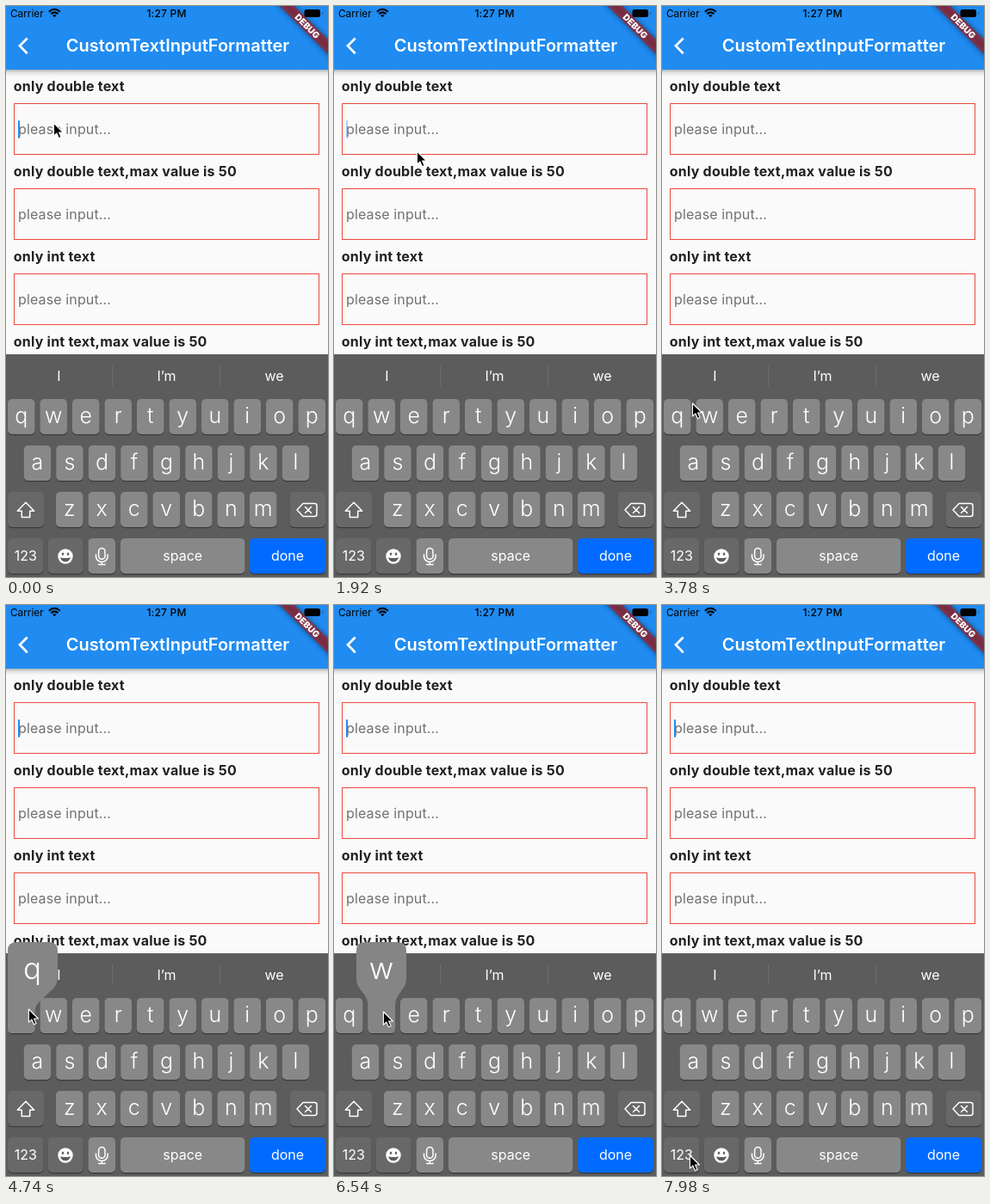
An HTML page that plays this animation: 374 by 664 pixels, repeating every 8 s.

```html
<!DOCTYPE html>
<html lang="en">
<head>
<meta charset="utf-8">
<title>Text input formatter</title>
<style>
html, body { margin: 0; width: 100%; height: 100%; overflow: hidden; background: #fafafa; }
svg { display: block; width: 374px; height: 664px; }
text { font-family: Inter, Roboto, sans-serif; fill: #fff; white-space: pre; }
.mid { text-anchor: middle; }
.label { font-size: 16px; font-weight: 700; letter-spacing: .22px; fill: #212121; }
.hint { font-size: 16px; letter-spacing: .13px; fill: #717171; }
.key { font-size: 25px; font-weight: 300; }
.word { font-size: 16px; }
.line { fill: none; stroke: #fff; stroke-width: 1.5; stroke-linejoin: round; stroke-linecap: round; }
</style>
</head>
<body>
<svg id="stage" viewBox="0 0 374 664">
  <defs>
    <filter id="soft" x="-20%" y="-100%" width="140%" height="300%"><feGaussianBlur stdDeviation="3"/></filter>
    <linearGradient id="drop" x2="0" y2="1">
      <stop stop-color="#000" stop-opacity=".3"/>
      <stop offset=".4" stop-color="#000" stop-opacity=".1"/>
      <stop offset="1" stop-color="#000" stop-opacity="0"/>
    </linearGradient>
  </defs>
  <rect width="374" height="664" fill="#fafafa"/>
  <g id="form"></g>
  <rect id="caret" x="14" y="133" width="2" height="21" rx="1" fill="#218bf0"/>

  <rect y="74" width="374" height="8" fill="url(#drop)"/>
  <rect width="374" height="74" fill="#208bf0"/>
  <path class="line" style="stroke-width:2.7;stroke-linecap:butt;stroke-linejoin:miter" d="M24.7 37.5L16 46.3L24.7 55.2"/>
  <text class="mid" x="199.5" y="53.3" font-size="20" font-weight="600">CustomTextInputFormatter</text>
  <g transform="translate(374 -.5) rotate(45)">
    <rect x="-50" y="28" width="100" height="12" fill="#000" opacity=".5" filter="url(#soft)"/>
    <rect x="-50" y="28" width="100" height="12" fill="#b71c1c" opacity=".627"/>
    <text class="mid" y="37.7" font-size="10.2" font-weight="900">DEBUG</text>
  </g>
  <text x="5" y="13" font-size="11.8" style="fill:#000">Carrier</text>
  <g fill="none" stroke="#000" stroke-width="2">
    <path d="M49.8 6.8Q56.3 .8 62.8 6.8M52.2 9.2Q56.3 5.6 60.4 9.2"/>
    <path d="M54 10.8Q56.3 9 58.6 10.8L56.3 13.2Z" fill="#000" stroke="none"/>
  </g>
  <text class="mid" x="186.5" y="13" font-size="12" font-weight="500" letter-spacing=".2" style="fill:#000">1:27 PM</text>
  <rect x="346.5" y="4" width="18.5" height="9" rx="2.5" fill="#000"/>
  <path d="M367 6.7Q368.8 8.5 367 10.3Z" fill="#000" opacity=".6"/>

  <rect y="405" width="374" height="259" fill="#5c5c5c"/>
  <path d="M123.5 418V442M248.5 418V442" stroke="#6e6e6e"/>
  <g id="keys"></g>
  <path class="line" d="M23 577.3L13.3 587.3H18.3V594.5H27.7V587.3H32.7Z"/>
  <path class="line" d="M345 578.5H358.5Q361 578.5 361 581V591Q361 593.5 358.5 593.5H345L338 586ZM347.5 582.5L354.5 589.5M354.5 582.5L347.5 589.5"/>
  <circle cx="69" cy="640" r="8.7" fill="#fff"/>
  <g fill="#5c5c5c">
    <ellipse cx="66" cy="637.3" rx="1.2" ry="1.7"/>
    <ellipse cx="72" cy="637.3" rx="1.2" ry="1.7"/>
    <path d="M63 641.2Q69 643 75 641.2Q73.8 646.3 69 646.3T63 641.2Z"/>
  </g>
  <rect class="line" x="107.6" y="630.5" width="7.4" height="12.8" rx="3.7"/>
  <path class="line" d="M104.5 638V640.2A6.8 6.2 0 0 0 118.1 640.2V638M111.3 646.5V649.3M107.5 649.5H115.1"/>
  <g id="popups"></g>
  <path id="pointer" d="M-.6 0V15.2L2.9 12L5.4 17.8L8.1 16.6L5.6 11H10.4Z" fill="#000" stroke="#fff" stroke-width="1.1" stroke-linejoin="round"/>
</svg>
<script>
const byId = id => document.getElementById(id);

function add(parent, tag, attrs, text) {
  const node = document.createElementNS("http://www.w3.org/2000/svg", tag);
  for (const name in attrs) node.setAttribute(name, attrs[name]);
  if (text) node.textContent = text;
  byId(parent).append(node);
  return node;
}

// Form
["only double text", "only double text,max value is 50", "only int text", "only int text,max value is 50"]
  .forEach((title, i) => {
    const y = i * 99;
    add("form", "text", { class: "label", x: 8.8, y: y + 99 }, title);
    if (i === 3) return;
    add("form", "rect", { x: 9.5, y: y + 113.5, width: 354, height: 59, fill: "none", stroke: "#ec4a40" });
    add("form", "text", { class: "hint", x: 14, y: y + 148.8 }, "please input...");
  });

// Keyboard
const LIGHT = "#888", DARK = "#686868", PITCH = 37.5;

function key(x, y, width, fill, label, cls = "word") {
  const box = { x, width, height: 41, rx: 5 };
  add("keys", "rect", { ...box, y: y + 1.2, fill: "#3a3a3a" });
  add("keys", "rect", { ...box, y, fill });
  const base = cls === "key" ? 28 : 26.3;
  if (label) add("keys", "text", { class: "mid " + cls, x: x + width / 2, y: y + base }, label);
}

[["qwertyuiop", 2, 457], ["asdfghjkl", 20.7, 511], ["zxcvbnm", 58, 565]].forEach(([letters, x, y]) =>
  [...letters].forEach((c, i) => key(x + i * PITCH, y, 31.5, LIGHT, c, "key")));
key(2, 565, 42, DARK);
key(329.5, 565, 41.5, DARK);
key(2, 619, 41.5, DARK, "123");
key(48.7, 619, 41, DARK);
key(95.5, 619, 31.5, LIGHT);
key(133, 619, 144.5, LIGHT, "space");
key(283, 619, 88, "#026bff", "done");
["I", "I’m", "we"].forEach((word, i) =>
  add("keys", "text", { class: "mid word", x: 61.5 + i * 125, y: 436 }, word));

// Enlarged key shapes
const popup = (d, letter, x) => {
  const shape = add("popups", "path", { d, fill: "#858585" });
  const text = add("popups", "text", { class: "mid", x, y: 434.5, "font-size": 35, "font-weight": 300 }, letter);
  return [shape, text];
};
const popups = {
  q: popup("M12 392H50Q60 392 60 402V433Q60 441 54 447L40 460Q33.5 466 33.5 473V493Q33.5 498 28.5 498H7Q2 498 2 493V402Q2 392 12 392Z", "q", 30.5),
  w: popup("M36 392H74Q84 392 84 402V434Q84 442 78 449Q71 457 71 467V493Q71 498 66 498H44.5Q39.5 498 39.5 493V467Q39.5 457 32 449Q26 442 26 434V402Q26 392 36 392Z", "w", 55)
};

const LOOP = 8000;
const PRESSES = [["q", 85, 90], ["q", 99, 105], ["w", 126, 131], ["w", 139, 144], ["w", 152, 156]];
const PATH = [
  [0, 56, 136], [18, 58, 139], [36, 88, 164], [40, 97, 169], [57, 91, 333], [72, 50, 433],
  [81, 36, 462], [90, 29, 471], [101, 27, 470], [108, 27, 470], [122, 58, 473], [157, 58, 473], [171, 33, 640]
];

// Steps come in threes that last 100, 20 and 20 ms.
function stepAt(ms) {
  const rest = ms % 140;
  return Math.floor(ms / 140) * 3 + (rest >= 120 ? 2 : rest >= 100 ? 1 : 0);
}

function pointerAt(step) {
  const i = PATH.findIndex(p => p[0] >= step);
  if (i <= 0) return PATH[i < 0 ? PATH.length - 1 : 0].slice(1);
  const [a, x0, y0] = PATH[i - 1], [b, x1, y1] = PATH[i];
  const p = (step - a) / (b - a);
  return [x0 + (x1 - x0) * p, y0 + (y1 - y0) * p];
}

// The caret stays on after each press, then blinks with a quarter-second fade.
function caretAt(step) {
  let start = 7;
  for (const [, down] of PRESSES) if (step >= down) start = down + 19.5;
  if (step < start) return 1;
  const phase = (step - start) % 30;
  const eased = 1 - (1 - Math.min(1, phase % 15 / 7.5)) ** 2;
  return phase < 15 ? 1 - eased : eased;
}

const begin = performance.now();
function draw() {
  const step = stepAt((performance.now() - begin) % LOOP);
  const [x, y] = pointerAt(step);
  byId("pointer").setAttribute("transform", `translate(${x} ${y})`);
  byId("caret").setAttribute("opacity", caretAt(step));
  for (const letter in popups) {
    const held = PRESSES.some(([c, down, up]) => c === letter && step >= down && step < up);
    for (const node of popups[letter]) node.style.display = held ? "" : "none";
  }
  requestAnimationFrame(draw);
}
draw();
</script>
</body>
</html>
```
